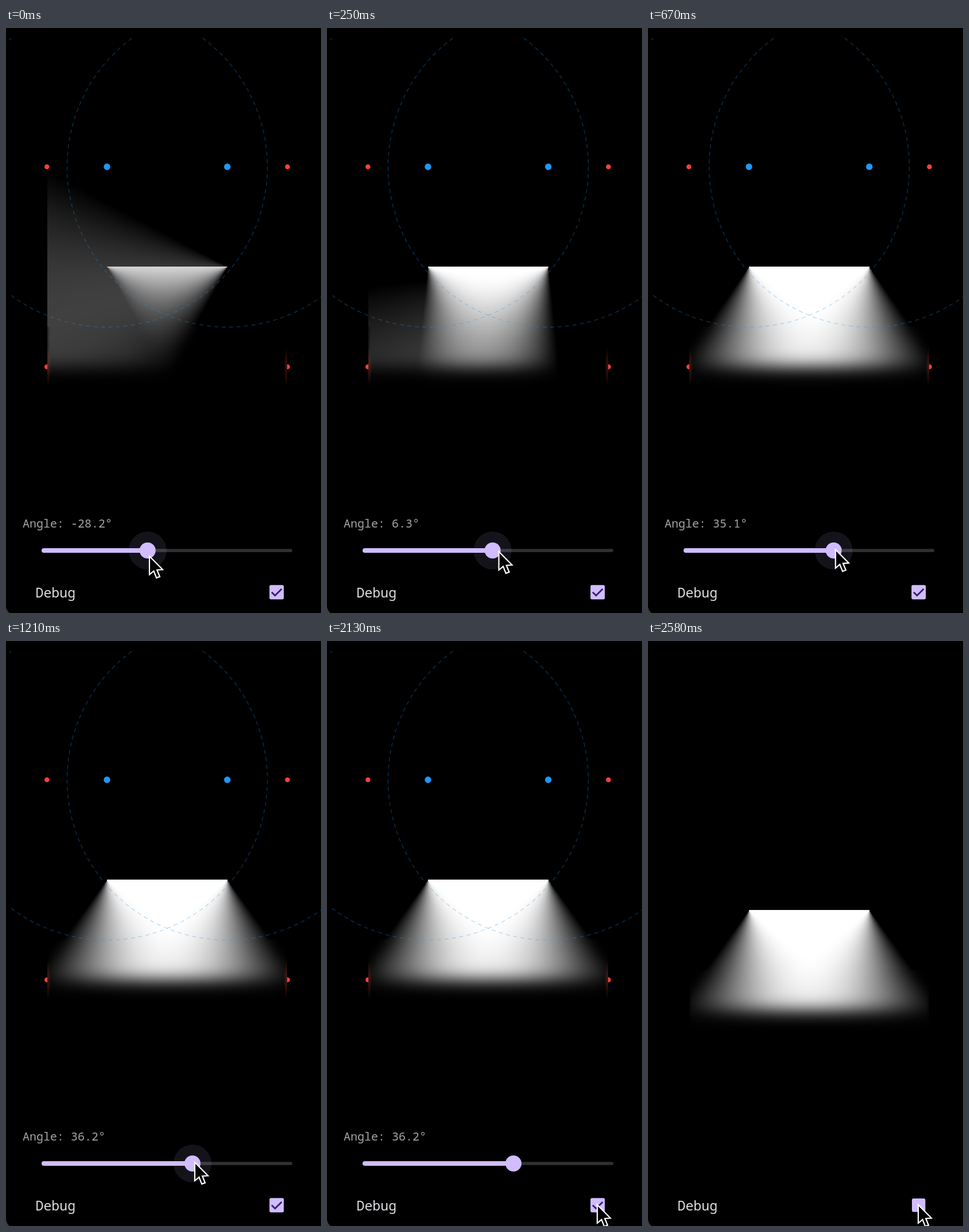
Animation, 549 px wide and 1020 px high, one loop 2630 ms. Source, as an HTML page with a canvas:

```html
<!DOCTYPE html>
<html lang="en">
<head>
<meta charset="utf-8">
<title>Light angle</title>
<style>
  html, body { margin: 0; width: 100%; height: 100%; overflow: hidden; background: #000; }
  canvas, svg { position: absolute; left: 0; top: 0; width: 549px; height: 1020px; display: block; }
  text { font-family: "Roboto Mono", "Noto Sans Mono", monospace; white-space: pre; }
</style>
</head>
<body>
<canvas id="stage" width="549" height="1020"></canvas>
<svg viewBox="0 0 549 1020">
  <defs><clipPath id="view"><rect x="6" y="17" width="543" height="800"/></clipPath></defs>
  <path d="M0 1009Q1 1016 6 1020H0Z" fill="#3c3c3e"/>
  <g id="debug">
    <g clip-path="url(#view)" fill="none" stroke="#2196f3" stroke-opacity=".34" stroke-width="1.3" stroke-dasharray="7 6">
      <circle cx="176" cy="242" r="279.5"/>
      <circle cx="386" cy="242" r="279.5"/>
    </g>
    <g fill="#2196f3"><circle cx="176" cy="242" r="5.7"/><circle cx="385.7" cy="242" r="5.7"/></g>
    <g fill="#f44336"><circle cx="71.3" cy="242" r="4.3"/><circle cx="490.5" cy="242" r="4.3"/></g>
    <text id="label" x="29" y="871" font-size="20" fill="#a6a6a6"></text>
    <rect x="200" y="908.3" width="299" height="5.4" rx="2.7" fill="#303032"/>
    <rect id="track" x="62" y="907" height="8" rx="4" fill="#d0bcff"/>
    <circle id="ripple" cy="911" fill="#d0bcff" fill-opacity=".1"/>
    <circle id="thumb" cy="911" r="14" fill="#d0bcff"/>
  </g>
  <text x="51.5" y="993" font-size="23.2" fill="#e0dce2">Debug</text>
  <rect id="box" fill="#d0bcff" rx="2.8"/>
  <path id="check" fill="none" stroke="#381e72" stroke-width="2.8"/>
  <path id="cursor" d="M0 0V32L7.5 25.8L12.3 37.8L18 35.6L13.2 24L23 23.3Z" fill="#000" stroke="#fff" stroke-width="2.2"/>
</svg>
<script>
const LOOP = 2630, STEP = 1000 / 24;
const DEBUG_END = 2540;

// [time, value...]
const ANGLE = [[0, -28.2], [170, -5.2], [330, 17.8], [420, 26.5], [540, 32.8], [660, 35], [830, 36.2]];
const POINTER = [[0, 250, 921], [170, 288, 915], [330, 311, 911], [540, 325, 910], [830, 329, 909],
  [1210, 329, 909], [1420, 386, 931], [1630, 440, 955], [1710, 449, 959], [2130, 471, 983]];
const RIPPLE = [[1250, 33], [1420, 0]];

// Light area, in stage pixels
const LEFT = 72, TOP = 242, W = 418, H = 390;
const LAMP_Y = 416.4, LAMP_L = 176.2, LAMP_R = 385.8;
const FLOOR = 591, BLUR_TOP = 521, SIGMA = 14, REACH = 38;

const $ = id => document.getElementById(id);
const set = (id, attrs) => { for (const k in attrs) $(id).setAttribute(k, attrs[k]); };

function sample(keys, t) {
  if (t <= keys[0][0]) return keys[0].slice(1);
  for (let i = 1; i < keys.length; i++) {
    const a = keys[i - 1], b = keys[i];
    if (t <= b[0]) {
      const k = (t - a[0]) / (b[0] - a[0]);
      return a.slice(1).map((v, j) => v + (b[j + 1] - v) * k);
    }
  }
  return keys[keys.length - 1].slice(1);
}

const ctx = $("stage").getContext("2d");
const lightCanvas = document.createElement("canvas");
lightCanvas.width = W;
lightCanvas.height = H;
const lightCtx = lightCanvas.getContext("2d");
const pixels = lightCtx.createImageData(W, H);

// Sweep position of every pixel around each lamp corner, in quarter turns
const ROWS = FLOOR - TOP;
const sweepL = new Float32Array(W * ROWS), sweepR = new Float32Array(W * ROWS);
for (let i = 0; i < W * ROWS; i++) {
  const x = LEFT + i % W + 0.5, y = TOP + Math.floor(i / W) + 0.5;
  const quarter = Math.PI / 2;
  sweepL[i] = Math.atan2(x - LAMP_L, y - LAMP_Y) / quarter;
  sweepR[i] = Math.atan2(LAMP_R - x, y - LAMP_Y) / quarter;
}
const raw = new Float32Array(W * ROWS);
const kernel = [];
let kernelSum = 0;
for (let d = -REACH; d <= REACH; d++) {
  const w = Math.exp(-d * d / (2 * SIGMA * SIGMA));
  kernel.push(w);
  kernelSum += w;
}
const clamp = v => Math.max(0, Math.min(1, v));

// Each sweep fades unpremultiplied from opaque black to clear white
function shade(i, turn) {
  const u = clamp(sweepL[i] + turn), s = clamp(sweepR[i] + turn);
  const below = Math.floor(i / W) + TOP + 0.5 > LAMP_Y;
  return s * (1 - s) + (below ? s * u * (2 - u) : 0);
}

function renderLight(angle) {
  const turn = angle / 90, blurRow = BLUR_TOP - TOP;
  for (let i = 0; i < raw.length; i++) raw[i] = shade(i, turn);
  const row = new Float32Array(W);
  for (let y = 0; y < H; y++) {
    row.fill(0);
    if (y < blurRow) row.set(raw.subarray(y * W, (y + 1) * W));
    else {
      const end = Math.min(ROWS - 1, y + REACH);
      for (let sy = y - REACH; sy <= end; sy++) {
        const w = kernel[sy - y + REACH] / kernelSum;
        for (let x = 0, p = sy * W; x < W; x++, p++) row[x] += raw[p] * w;
      }
      for (let d = 0; d < 4; d++) {
        row[d] *= 0.6 + d * 0.1;
        row[W - 1 - d] *= 0.6 + d * 0.1;
      }
    }
    for (let x = 0; x < W; x++) {
      const p = (y * W + x) * 4;
      pixels.data[p] = pixels.data[p + 1] = pixels.data[p + 2] = Math.round(row[x] * 255);
      pixels.data[p + 3] = 255;
    }
  }
  lightCtx.putImageData(pixels, 0, 0);
}

function dot(x, y, r, color) {
  ctx.fillStyle = color;
  ctx.beginPath();
  ctx.arc(x, y, r, 0, Math.PI * 2);
  ctx.fill();
}

// Faint red streak where a blurred dot shows inside the light area
function streak(x, side) {
  ctx.save();
  ctx.beginPath();
  ctx.rect(side > 0 ? x : x - 8, 550, 8, 82);
  ctx.clip();
  ctx.globalCompositeOperation = "lighter";
  ctx.translate(x, FLOOR);
  ctx.scale(1, 6);
  const g = ctx.createRadialGradient(0, 0, 0, 0, 0, 6);
  g.addColorStop(0, "rgba(244,67,54,.3)");
  g.addColorStop(0.5, "rgba(244,67,54,.14)");
  g.addColorStop(1, "rgba(244,67,54,0)");
  ctx.fillStyle = g;
  ctx.fillRect(-8, -7, 16, 14);
  ctx.restore();
}

function drawStage(debug) {
  ctx.fillStyle = "#000";
  ctx.fillRect(0, 0, 549, 1020);
  if (debug) {
    dot(71.3, 590.7, 4.3, "#f44336");
    dot(490.5, 590.7, 4.3, "#f44336");
  }
  ctx.drawImage(lightCanvas, LEFT, debug ? TOP : TOP + 53);
  if (debug) {
    streak(LEFT, 1);
    streak(LEFT + W, -1);
  }
}

function drawControls(t, angle, debug) {
  const thumbX = 281 + 1.214 * angle;
  $("debug").style.display = debug ? "" : "none";
  $("label").textContent = "Angle: " + angle.toFixed(1) + "°";
  set("track", { width: thumbX - 62 });
  set("thumb", { cx: thumbX });
  set("ripple", { cx: thumbX, r: sample(RIPPLE, t)[0] });

  const inset = debug ? 0 : 0.8, size = 25 - 2 * inset;
  set("box", { x: 459.2 + inset, y: 971.3 + inset, width: size, height: size });
  set("check", { d: debug ? "M463 983.8L468.9 989.6L480.5 978" : "M466.5 987.3L468.9 989.6L474 984.5" });
  $("check").style.display = t < DEBUG_END + 40 ? "" : "none";
  const [px, py] = sample(POINTER, t);
  set("cursor", { transform: `translate(${px} ${py})` });
}

let lastAngle = null, lastTime = -1;
function draw(now) {
  const n = Math.min(62, Math.floor((now % LOOP + 4) / STEP));
  const t = Math.round(n * STEP / 10) * 10;
  if (t === lastTime) return;
  lastTime = t;
  const angle = sample(ANGLE, t)[0], debug = t < DEBUG_END;
  if (angle !== lastAngle) {
    renderLight(angle);
    lastAngle = angle;
  }
  drawStage(debug);
  drawControls(t, angle, debug);
}

const start = performance.now();
function tick() {
  draw(performance.now() - start);
  requestAnimationFrame(tick);
}
tick();
</script>
</body>
</html>
```
